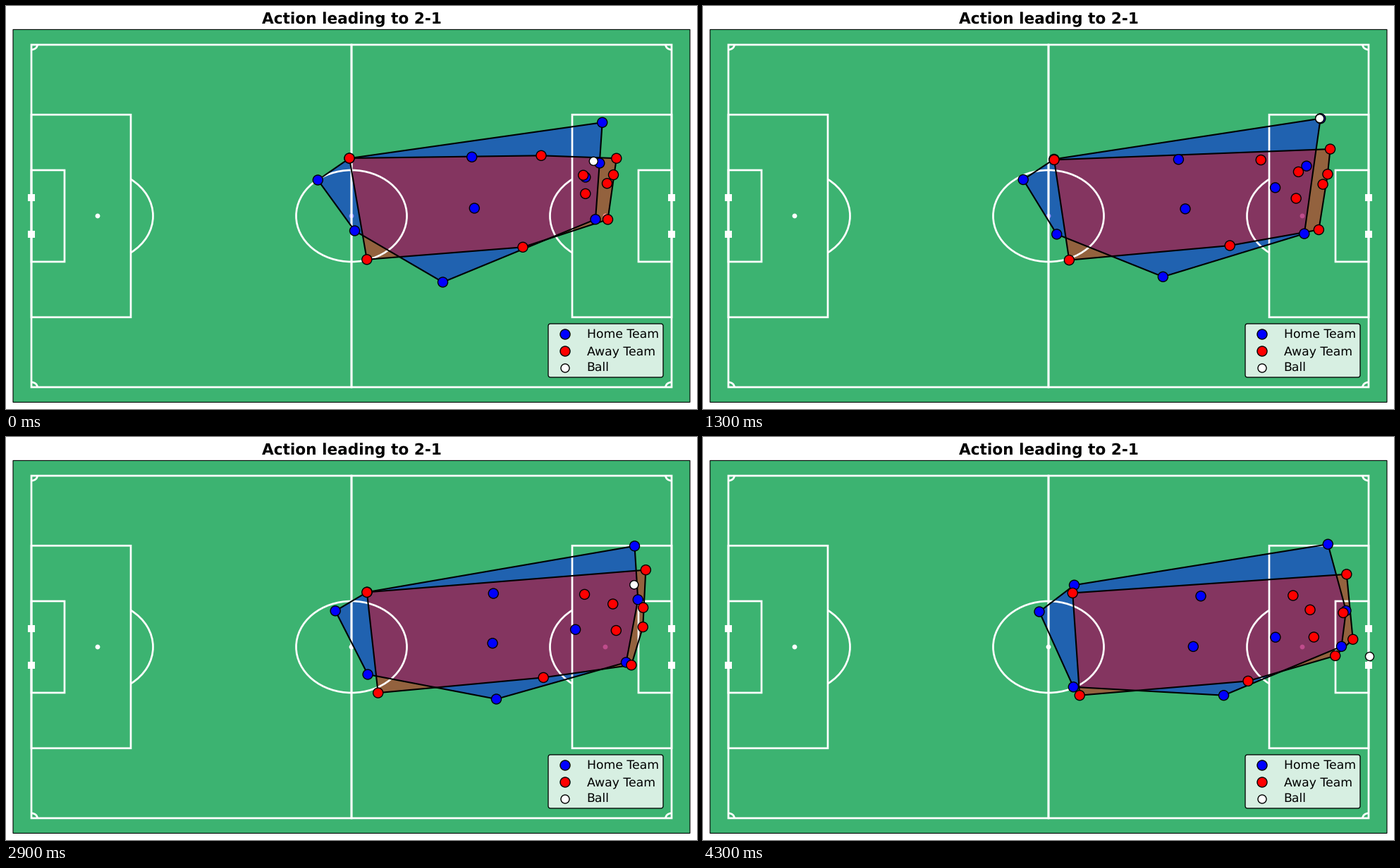
A matplotlib script that plays this animation: 980x572 px, repeating every 4400 ms.

```python
import numpy as np
import matplotlib.pyplot as plt
from matplotlib.animation import FuncAnimation
from matplotlib.patches import Arc, Circle, Ellipse, FancyBboxPatch, Polygon, Rectangle

W, H, DPI = 980, 572, 100
FRAMES, INTERVAL = 44, 100
PX = 72 / DPI

plt.rcParams["font.family"] = "DejaVu Sans"
plt.rcParams["text.hinting"] = "none"


def run(*points):
    """Smooth path through a few points, evenly spaced in time."""
    k = len(points)
    coefs = np.polyfit(np.linspace(0, 1, k), np.array(points, float), k - 1)
    return lambda n: np.polyval(coefs, n / (FRAMES - 1))


winger = run((845.7, 165.3), (887, 156.8), (886.3, 152.2))

home = [
    run((442.3, 247), (461.3, 246.5), (477, 248)),
    run((494.5, 319), (507.4, 329.9), (525.3, 354.8)),
    run((619.5, 392), (655.8, 383.3), (694.5, 372.2), (738.5, 366.7)),
    run((660.7, 214.3), (706, 225.8)),
    run((664.3, 287), (685, 288.2), (690, 292.6), (695.3, 297.4)),
    winger,
    run((841.8, 223), (859, 227.3), (895.5, 230.7), (912, 246.5)),
    run((821.8, 243), (808.3, 266.4), (811.9, 284.2)),
    run((836, 302.8), (854.8, 324), (878.9, 320.2), (905.5, 297.3)),
    run((487, 216.2), (499, 217.8), (511.9, 220.2), (526.5, 210.2)),
]

away = [
    run((487, 216), (505.3, 219.5), (524.2, 221.4)),
    run((511.8, 359.8), (523.9, 361.8), (534.2, 366.7)),
    run((733, 342.3), (755.5, 340.2), (773, 346.4)),
    run((759, 212.3), (808.2, 221.5), (836.8, 225)),
    run((865.8, 216.2), (891.5, 201.5), (907.1, 188.8), (912.8, 194.8)),
    run((861.5, 239.6), (897, 239.9), (908, 249.5)),
    run((852.5, 251.8), (881.4, 254), (902.8, 269.2), (921.7, 287.2)),
    run((818.7, 240.2), (855.2, 235.2), (861, 245.3)),
    run((821.8, 266.4), (843.5, 273.2), (865, 274.5), (866.3, 284)),
    run((853.5, 303), (874.8, 318.7), (886.7, 323.8), (896.7, 310.5)),
]

RECEIVE, CROSS, SHOT, GOAL = 8, 24, 38, 43


def ball_position(n):
    """Straight passes between touches; the winger carries it in between."""
    if RECEIVE <= n <= CROSS:
        return winger(n) - (1, 0)
    times = [0, RECEIVE, CROSS, SHOT, GOAL]
    touches = np.array([(833.3, 220.3), winger(RECEIVE) - (1, 0), winger(CROSS) - (1, 0),
                        (895.7, 306.5), (945.5, 311.5)])
    return np.array([np.interp(n, times, axis) for axis in touches.T])


def hull(points):
    """Convex hull by monotone chain."""
    pts = sorted(map(tuple, points))

    def chain(seq):
        out = []
        for p in seq:
            while len(out) > 1:
                (x0, y0), (x1, y1) = out[-2:]
                if (x1 - x0) * (p[1] - y0) - (y1 - y0) * (p[0] - x0) > 0:
                    break
                out.pop()
            out.append(p)
        return out[:-1]

    return chain(pts) + chain(pts[::-1])


fig = plt.figure(figsize=(W / DPI, H / DPI), dpi=DPI, facecolor="white")
ax = fig.add_axes([0, 0, 1, 1])
ax.set_xlim(0, W)
ax.set_ylim(H, 0)
ax.axis("off")


def add(patch):
    patch.set_snap(False)
    return ax.add_patch(patch)


def dot(color, r=7.0, z=3, center=(0, 0)):
    return add(Circle(center, r, fc=color, ec="black", lw=1.4 * PX, zorder=z))


def area(color, z):
    corner = [(0, 0)] * 3
    return [add(Polygon(corner, fc=color, alpha=0.45, lw=0, zorder=z)),
            add(Polygon(corner, fill=False, ec="black", lw=2.1 * PX, zorder=2.5))]


def draw_pitch():
    left, right, top, bottom, mid_x, mid_y = 36, 944, 55, 541, 490, 298
    rx, ry, spot = 78.5, 65, 94
    line = dict(ec="white", lw=2.7 * PX, zorder=2)

    def box(w, h, x=left):
        add(Rectangle((x, mid_y - h / 2), w, h, fill=False, **line))

    def arc(x, y, w, h, a, b):
        add(Arc((x, y), w, h, theta1=a, theta2=b, **line))

    add(Rectangle((10, 33.4), 960, 529, fc="mediumseagreen", ec="black",
                  lw=1.1 * PX, zorder=0))
    box(mid_x - left, bottom - top)
    box(right - mid_x, bottom - top, mid_x)
    add(Ellipse((mid_x, mid_y), 2 * rx, 2 * ry, fill=False, **line))
    for w, h in ((141, 287.5), (47, 130)):
        box(w, h)
        box(w, h, right - w)

    half = np.degrees(np.arctan2(52, 47))
    arc(left + spot, mid_y, 2 * rx, 2 * ry, -half, half)
    arc(right - spot, mid_y, 2 * rx, 2 * ry, 180 - half, 180 + half)
    corners = [(left, top), (right, top), (right, bottom), (left, bottom)]
    for k, (x, y) in enumerate(corners):
        arc(x, y, 17, 14, 90 * k, 90 * k + 90)

    for x in (left + spot, mid_x, right - spot):
        add(Circle((x, mid_y), 3.4, fc="white", lw=0, zorder=0.5))
    for x in (left, right):
        for y in (mid_y - 26, mid_y + 26):
            add(Rectangle((x - 5, y - 5), 10, 10, fc="white", lw=0, zorder=2))


def draw_legend():
    add(FancyBboxPatch((769, 451), 163, 76, fc=(1, 1, 1, 0.8), ec="black",
                       boxstyle="round,pad=0,rounding_size=3.4", lw=1.3 * PX, zorder=6))
    rows = [("Home Team", "blue", 7.0), ("Away Team", "red", 7.0), ("Ball", "white", 6.0)]
    for k, (name, color, r) in enumerate(rows):
        y = 466 + 24 * k
        dot(color, r, 7, (793, y))
        ax.text(823.5, y + 5, name, size=12.4, va="baseline", zorder=7)


draw_pitch()
draw_legend()
ax.text(W / 2, 25, "Action leading to 2-1", size=15.6, weight="bold",
        ha="center", va="baseline")

teams = [
    (home, [dot("blue", z=3) for _ in home], area("blue", 1)),
    (away, [dot("red", z=4) for _ in away], area("red", 1.1)),
]
ball = dot("white", 6.0, 5)


def update(n):
    for runs, dots, shapes in teams:
        spots = [path(n) for path in runs]
        outline = hull(spots)
        for shape in shapes:
            shape.set_xy(outline)
        for d, p in zip(dots, spots):
            d.center = tuple(p)
    ball.center = tuple(ball_position(n))
    return []


anim = FuncAnimation(fig, update, frames=FRAMES, interval=INTERVAL, repeat=True, repeat_delay=0)
plt.show()
```
